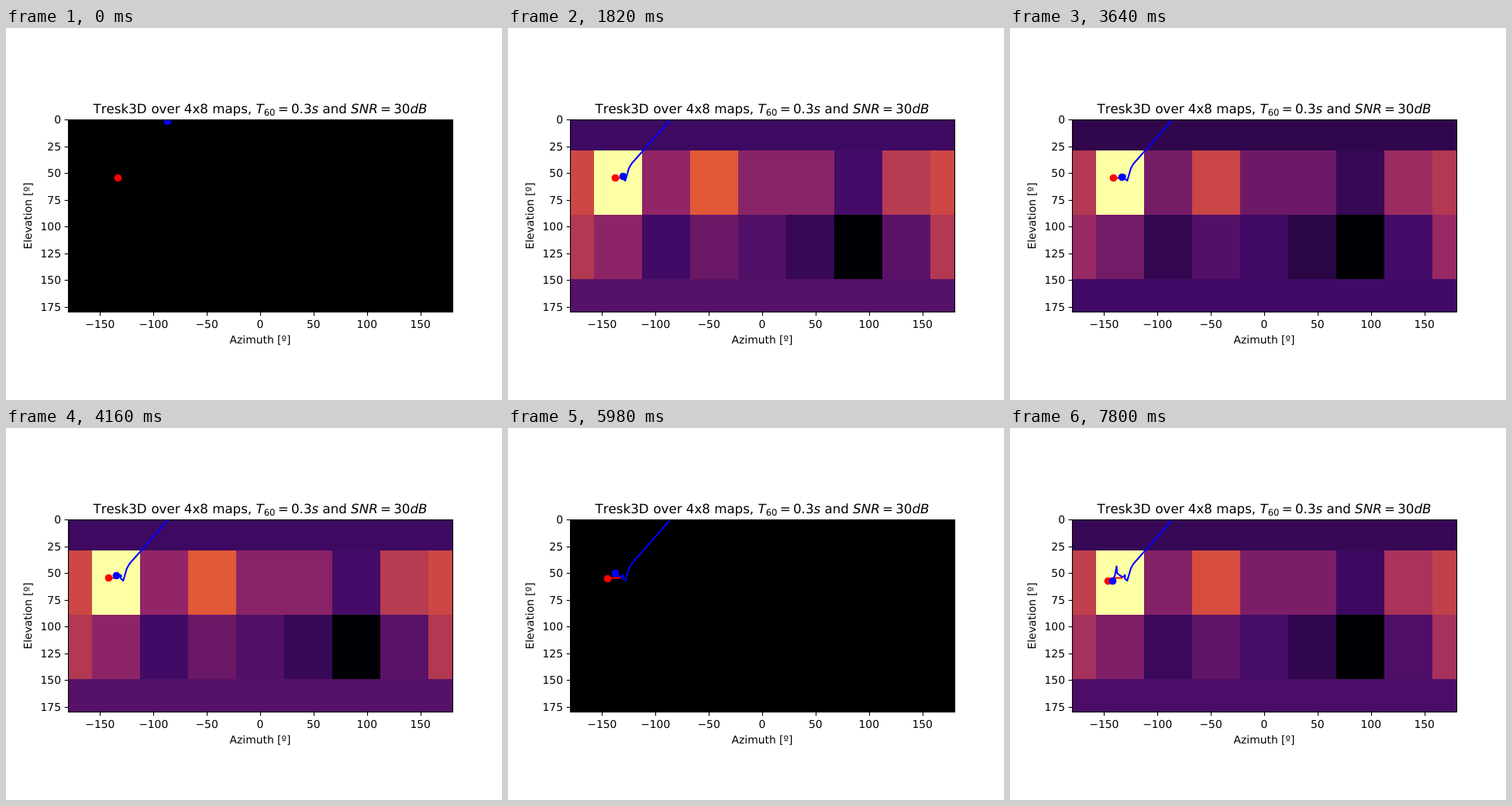
Recreate the animation shown at these times as an HTML page. Size 640 px wide and 480 px high, loop 8 s.

```html
<!DOCTYPE html>
<html lang="en">
<head>
<meta charset="utf-8">
<title>Direction tracking map</title>
<style>
  html, body { margin: 0; width: 100%; height: 100%; overflow: hidden; background: #fff; }
  svg { display: block; width: 640px; height: 480px; }
  text { font: 13.89px "DejaVu Sans", sans-serif; font-kerning: none; text-rendering: geometricPrecision; }
  .title text { font-size: 16.67px; }
  .title .sub { font-size: 11.67px; }
  .title .it { font-style: oblique; }
  .mid { text-anchor: middle; }
  .end { text-anchor: end; }
  .axis { fill: none; stroke: #000; stroke-width: 1.11; }
  polyline { fill: none; stroke-width: 2.08; stroke-linejoin: round; stroke-linecap: square; }
</style>
</head>
<body>
<svg viewBox="0 0 640 480">
  <clipPath id="area"><rect x="80" y="118" width="496" height="248.4"/></clipPath>
  <g id="cells" shape-rendering="crispEdges" clip-path="url(#area)"></g>
  <g id="tracks" clip-path="url(#area)"></g>
  <g id="axes"><rect class="axis" x="80.5" y="118.5" width="496" height="248"/></g>
  <g class="title">
    <text x="112.6" y="110">Tresk3D</text>
    <text x="187.4" y="110">over 4x8 maps,</text>
    <text class="it" x="322.5" y="110">T</text>
    <text class="sub" x="332.7" y="112.7">60</text>
    <text x="350.8" y="110">=</text>
    <text x="368" y="110">0.3</text>
    <text class="it" x="394.5" y="110">s</text>
    <text x="408.5" y="110">and</text>
    <text class="it" x="445.1" y="110">SNR</text>
    <text x="483" y="110">=</text>
    <text x="500.2" y="110">30</text>
    <text class="it" x="521.4" y="110">dB</text>
  </g>
  <text class="mid" x="328" y="407">Azimuth [º]</text>
  <text class="mid" transform="translate(33.3 242.4) rotate(-90)">Elevation [º]</text>
</svg>
<script>
const STEP = 260, LOOP = 8000, LAST = 30;

// Inferno colour scale
const SCALE = ["#000004", "#420a68", "#932667", "#dd513a", "#fca50a", "#fcffa4"]
  .map(c => [1, 3, 5].map(i => parseInt(c.slice(i, i + 2), 16)));

// Mean power of each map row; the outer rows are one band
const ROWS = [
  [.17],
  [.53, 1, .37, .59, .35, .35, .19, .47],
  [.46, .36, .18, .28, .22, .15, 0, .24],
  [.23]
];

// Turning points of the estimate: step, x, y
const TURNS = [[0, 208, 120], [1, 159.5, 175], [2, 156, 181], [4, 151.3, 197], [6, 148, 194],
  [8, 148, 189.5], [10, 148.8, 191.3], [14, 144.5, 192], [19, 140.3, 189],
  [23, 138.3, 187.3], [25, 137.5, 178.5], [27, 135.5, 190], [30, 132.2, 197.3]];

const mix = (a, b, f) => a + (b - a) * f;

function estimate(n) {
  const i = Math.max(1, TURNS.findIndex(k => k[0] >= n));
  const [m, x, y] = TURNS[i - 1], [m2, x2, y2] = TURNS[i], f = (n - m) / (m2 - m);
  return [mix(x, x2, f), mix(y, y2, f)];
}

const truth = n => [144.4 - 17.8 * Math.sin(n / 21), 193.5 + 3.8 * (n / LAST) ** 4];

const silent = n => n % 23 === 0;

// The level swells and fades, leaving the weakest and strongest cells alone
function power(mean, n) {
  const level = .09 * Math.cos((n - 19) * 2 * Math.PI / 15);
  return mean + level * 4 * mean * (1 - mean);
}

function colour(p) {
  const i = Math.min(4, Math.floor(p * 5));
  return `rgb(${SCALE[i].map((v, j) => Math.round(mix(v, SCALE[i + 1][j], p * 5 - i)))})`;
}

function add(parent, tag, attrs, text = "") {
  const el = document.createElementNS("http://www.w3.org/2000/svg", tag);
  for (const k in attrs) el.setAttribute(k, attrs[k]);
  el.textContent = text;
  document.getElementById(parent).append(el);
  return el;
}

const label = v => String(v).replace("-", "−");
for (let v = -150; v <= 150; v += 50) {
  const x = 328 + v * 496 / 360;
  add("axes", "path", { class: "axis", d: `M${Math.round(x) + .5} 366.5v4.9` });
  add("axes", "text", { class: "mid", x, y: 387 }, label(v));
}
for (let v = 0; v <= 175; v += 25) {
  const y = Math.round(118.4 + v * 248 / 180);
  add("axes", "path", { class: "axis", d: `M80.5 ${y + .5}h-4.9` });
  add("axes", "text", { class: "end", x: 71, y: y + 5 }, label(v));
}

// Columns are centred on their angle, so the first one wraps to the right edge
const cells = ROWS.flatMap((row, r) => {
  const width = 496 / row.length;
  return [...row, row[0]].map((mean, c) => ({
    mean,
    el: add("cells", "rect", { x: 80 + (c - .5) * width, y: 75 + r * 83, width, height: 83 })
  }));
});

const tracks = [[truth, "#f00"], [estimate, "#00f"]].map(([path, c]) => ({
  points: Array.from({ length: LAST + 1 }, (_, n) => path(n)),
  line: add("tracks", "polyline", { stroke: c }),
  dot: add("tracks", "circle", { r: 4.86, fill: c })
}));

function draw(n) {
  for (const { mean, el } of cells)
    el.setAttribute("fill", silent(n) ? "#000" : colour(power(mean, n)));
  for (const { points, line, dot } of tracks) {
    line.setAttribute("points", points.slice(0, n + 1).join(" "));
    const [x, y] = points[n].map(v => Math.floor(v) + .5);
    dot.setAttribute("cx", x);
    dot.setAttribute("cy", y);
  }
}

const start = performance.now();
function tick() {
  const t = (performance.now() - start) % LOOP;
  draw(Math.min(LAST, Math.floor(t / STEP)));
  requestAnimationFrame(tick);
}
tick();
</script>
</body>
</html>
```
